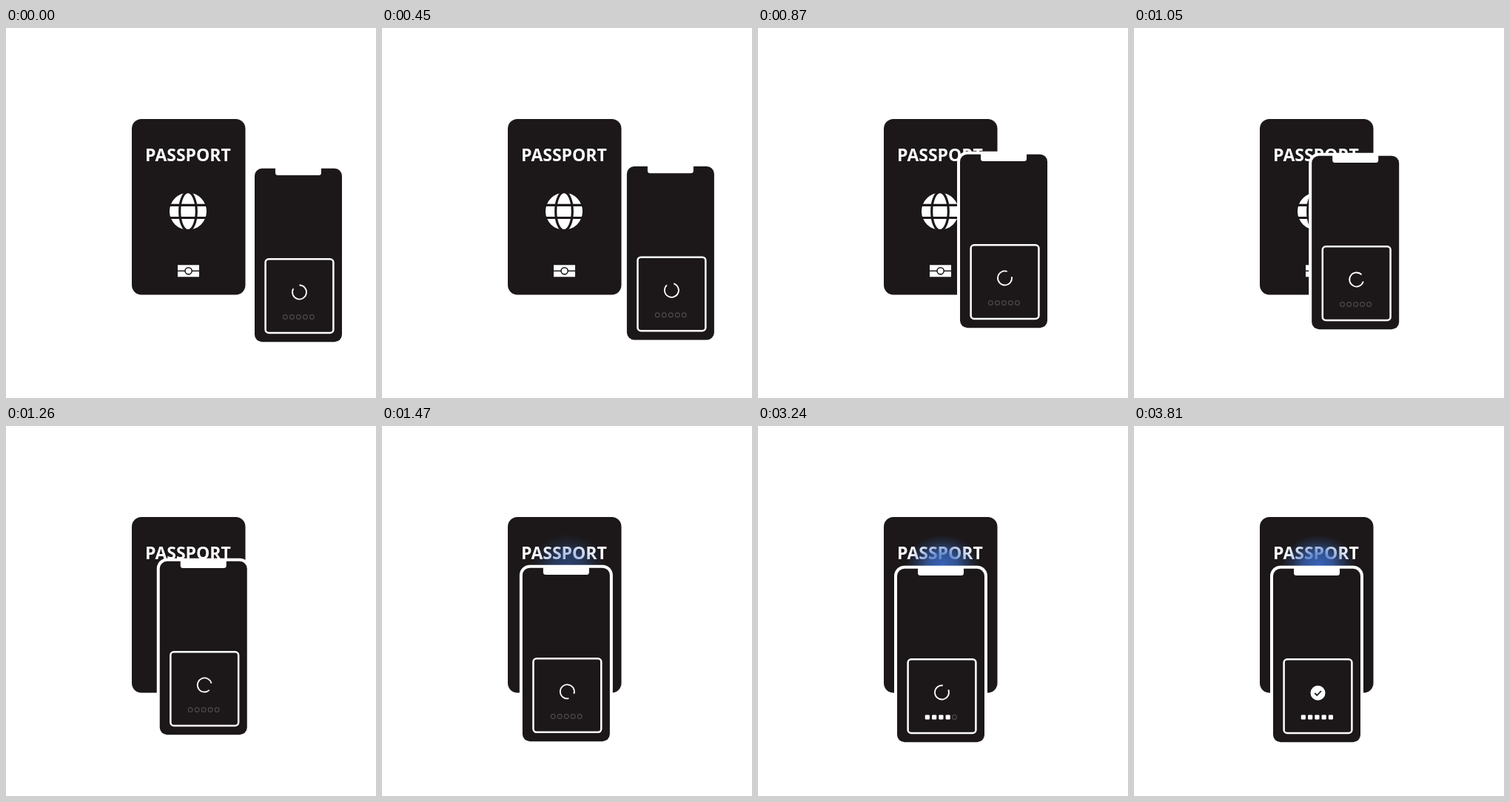
Animation of 500 by 500 pixels, one loop 4.98 s. Source, as an HTML page:

```html
<!DOCTYPE html>
<html lang="en">
<head>
<meta charset="utf-8">
<title>Passport scan</title>
<style>
  html, body { margin: 0; width: 100%; height: 100%; overflow: hidden; background: #fff; }
  svg { display: block; width: 100%; height: 100%; }
  text { font: 700 23px "Open Sans", "Noto Sans", sans-serif; }
</style>
</head>
<body>
<svg viewBox="0 0 500 500">
  <defs>
    <radialGradient id="blue">
      <stop offset="0" stop-color="#3c6cc8" stop-opacity=".9"/>
      <stop offset=".4" stop-color="#3a69c2" stop-opacity=".72"/>
      <stop offset=".72" stop-color="#3663b8" stop-opacity=".28"/>
      <stop offset="1" stop-color="#3663b8" stop-opacity="0"/>
    </radialGradient>
  </defs>

  <g fill="#fff" stroke="#1c1819" stroke-width="0">
    <rect x="170" y="123" width="153.5" height="237.5" rx="13" fill="#1c1819"/>
    <text x="246" y="180" text-anchor="middle">PASSPORT</text>
    <circle cx="246" cy="247.7" r="25"/>
    <g fill="none" stroke-width="3.2">
      <ellipse cx="246" cy="247.7" rx="11.3" ry="26"/>
      <path d="M220 239.3h52M220 256.5h52"/>
    </g>
    <path d="M232 320.3h29v16h-29z"/>
    <path d="M232 328.3h29" stroke-width="1.5"/>
    <circle cx="246.6" cy="328.3" r="4.6" stroke-width="1.6"/>
  </g>

  <g id="phone">
    <ellipse id="glow" cx="397" cy="185" rx="50" ry="41" fill="url(#blue)"/>
    <rect x="332" y="185.7" width="126" height="242.5" rx="14" fill="#fff"/>
    <rect x="336" y="189.7" width="118" height="234.5" rx="10" fill="#1c1819"/>
    <rect x="364" y="186" width="62" height="13" rx="3.5" fill="#fff"/>
    <rect x="350.6" y="312.3" width="91.8" height="99.6" rx="4.5" fill="none" stroke="#fff" stroke-width="2.5"/>
    <path id="spinner" fill="none" stroke="#fff" stroke-width="1.8"/>
    <g id="dots"></g>
    <g id="check">
      <circle cx="396.5" cy="357.8" r="10" fill="#fff"/>
      <path d="M392.3 358l3 3 5.700-6" fill="none" stroke="#1c1819" stroke-width="1.8"/>
    </g>
  </g>
</svg>

<script>
const LOOP = 4980, STEP = 30;
const $ = id => document.getElementById(id);
const phone = $("phone"), glow = $("glow"), spinner = $("spinner"), check = $("check");

const ramp = (t, from, to) => Math.min(1, Math.max(0, (t - from) / (to - from)));
const sine = k => (1 - Math.cos(Math.PI * k)) / 2;

function addRect(attrs) {
  const el = document.createElementNS("http://www.w3.org/2000/svg", "rect");
  for (const key in attrs) el.setAttribute(key, attrs[key]);
  $("dots").append(el);
  return el;
}

function square(cx, size, attrs) {
  return addRect({ x: cx - size / 2, y: 390.5 - size / 2, width: size, height: size, ...attrs });
}

const fills = [0, 1, 2, 3, 4].map(i => {
  square(395.4 + 9 * (i - 2), 5.4, { rx: 1.5, fill: "none", stroke: "#686566", "stroke-width": 0.9 });
  return square(395.4 + 9.3 * (i - 2), 6, { rx: 0.8, fill: "#fff" });
});

function arc(gapCenter) {
  const cx = 396.5, cy = 357, r = 9.5;
  const point = deg => {
    const a = deg * Math.PI / 180;
    return `${cx + r * Math.sin(a)} ${cy - r * Math.cos(a)}`;
  };
  return `M${point(gapCenter + 30)}A${r} ${r} 0 1 1 ${point(gapCenter - 30)}`;
}

function draw(t) {
  // The phone follows a parabola from the side onto the passport.
  const q = t < 330 ? 0 : sine(ramp(t, 300, 1560));
  phone.setAttribute("transform", `translate(${-148 * q} ${3 * q - 83 * q * (1 - q)})`);
  glow.setAttribute("opacity", ramp(t, 1300, 1620));

  spinner.setAttribute("d", arc(-30 + 0.147 * Math.max(0, t - 330)));
  spinner.setAttribute("opacity", 1 - ramp(t, 3390, 3540));
  fills.forEach((dot, i) => dot.setAttribute("opacity", ramp(t, 2640 + 150 * i, 2760 + 150 * i)));
  check.setAttribute("opacity", ramp(t, 3540, 3810));
}

const start = performance.now();
function tick() {
  const t = (performance.now() - start) % LOOP;
  draw(Math.floor(t / STEP) * STEP);
  requestAnimationFrame(tick);
}
tick();
</script>
</body>
</html>
```
